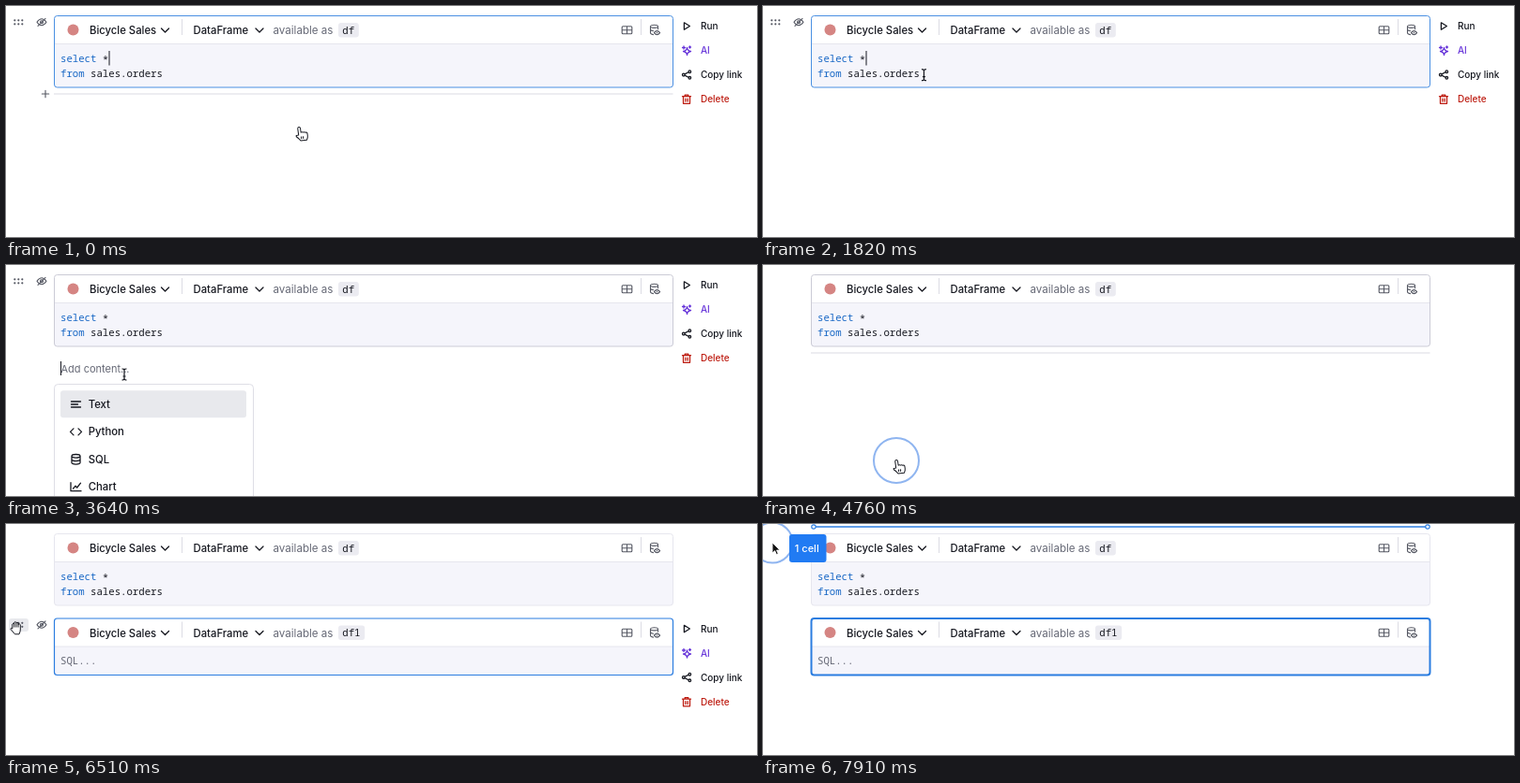
Animation of 800 by 247 pixels, one loop 8000 ms. Source, as an HTML page:

```html
<!DOCTYPE html>
<html lang="en">
<head>
<meta charset="utf-8">
<title>Adding a SQL cell</title>
<style>
  html, body { margin: 0; width: 100%; height: 100%; overflow: hidden; background: #fff; }
  svg { display: block; width: 800px; height: 247px; }
  text { font: 500 11.3px Inter, sans-serif; fill: #15171f; white-space: pre; }
  .muted { font-weight: 400; font-size: 11.6px; fill: #666976; }
  .code { font: 500 10.68px "Noto Sans Mono", monospace; }
  .key { fill: #1767c5; }
  .small { font-size: 10px; }
  .icon { fill: none; stroke: #15171f; stroke-width: 1.3; stroke-linecap: round; stroke-linejoin: round; }
  .gray { stroke: #555863; stroke-width: 1.1; }
  .pointer { fill: #fff; stroke: #15171f; stroke-width: 1; stroke-linejoin: round; }
</style>
</head>
<body>
<svg id="stage" viewBox="0 0 800 247"></svg>
<script>
const LOOP = 8000, STEP = 70;
const BLUE = '#2b7de0';

const text = (x, y, label, cls = '', extra = '') =>
  `<text x="${x}" y="${y}" class="${cls}" ${extra}>${label}</text>`;
const icon = (x, y, d, extra = '', cls = '') =>
  `<path class="icon ${cls}" transform="translate(${x} ${y})" d="${d}" ${extra}/>`;
const group = (id, body, y = 0) => `<g id="${id}" transform="translate(0 ${y})">${body}</g>`;
const vline = (x, y1, y2, color) => `<path d="M${x} ${y1}V${y2}" stroke="${color}"/>`;

const chevron = 'M-4-2L0 2L4-2';
const grid = 'M-4.3-4h8.6q1 0 1 1v6q0 1-1 1h-8.6q-1 0-1-1v-6q0-1 1-1zM-5.3 0H5.3M0-4V4';
const cylinder = 'M-4.5-3.5a4.5 1.8 0 0 1 9 0a4.5 1.8 0 0 1-9 0V3.5a4.5 1.8 0 0 0 9 0V-3.5M-4.5 0a4.5 1.8 0 0 0 9 0';
const dataView = 'M-4.5-4a4 1.6 0 0 1 8 0a4 1.6 0 0 1-8 0V3q0 1.4 3 1.8M3.5-4V-1M-4.5-.6q.5 1.2 3.2 1.5M-.6 2.8q3.1-4 6.2 0q-3.1 4-6.2 0M2.4 2.8h.2';

function cell(id, y, bodyHeight, variable, code) {
  const chip = 9 + variable.length * 6.4;
  return group(id, `
    <rect x="51.5" y="10.5" width="659" height="${30 + bodyHeight}" rx="3" fill="#fff"/>
    <path d="M51.5 40.5h659v${bodyHeight - 3}q0 3-3 3h-653q-3 0-3-3z" fill="#f5f5fb"/>
    <path d="M52 40.5H710" stroke="#e6e6ee"/>
    <rect id="${id}Border" x="51.5" y="10.5" width="659" height="${30 + bodyHeight}" rx="3" fill="none"/>
    <circle cx="71.5" cy="25.5" r="6" fill="#d58583"/>
    ${text(89, 30, 'Bicycle Sales')}${icon(169.5, 26, chevron, 'stroke-width="1.6"')}
    ${vline(187.5, 14, 31, '#dcdce4')}
    ${text(199.5, 30, 'DataFrame')}${icon(270, 26, chevron, 'stroke-width="1.6"')}
    ${text(284.5, 30, 'available as', 'muted')}
    <rect x="354" y="18" width="${chip}" height="15.5" rx="3" fill="#ebebf1"/>
    ${text(358.3, 29.6, variable, 'code')}
    ${icon(661.5, 25.8, grid, '', 'gray')}${vline(676.5, 14, 31, '#dcdce4')}
    ${icon(691, 25.8, dataView, '', 'gray')}${code}`, y);
}

function controls(id, y) {
  let dots = '';
  for (let i = 0; i < 6; i++)
    dots += `<circle cx="${9.3 + (i % 3) * 4}" cy="${15.3 + (i > 2) * 4}" r="1.1" fill="#555863"/>`;
  const purple = 'style="stroke:#6633d9"', red = 'style="stroke:#bd1b10"';
  return group(id, `${dots}
    ${icon(38, 17.3, 'M-5 0q5-7 10 0q-5 7-10 0M-1.5 0a1.5 1.5 0 0 0 3 0a1.5 1.5 0 0 0-3 0M-4 4L4-4', '', 'gray')}
    ${icon(725, 21.5, 'M-2.6-3.7L3.4 0L-2.6 3.7z')}${text(740, 25, 'Run', 'small')}
    ${icon(725, 47.5, 'M.5-3Q1 .5 4.5 1Q1 1.5.5 5Q0 1.5-3.5 1Q0 .5.5-3zM-3-4.5v3M-4.5-3h3M3.5-4.5v2M2.5-3.5h2', purple)}
    ${text(740, 51, 'AI', 'small', 'style="fill:#6633d9"')}
    ${icon(725, 73.5, 'M-2 -.6L2-2.8M-2 .6L2 2.8M-4.5 0a1.3 1.3 0 0 0 2.6 0a1.3 1.3 0 0 0-2.6 0M2-3.3a1.3 1.3 0 0 0 2.6 0a1.3 1.3 0 0 0-2.6 0M2 3.3a1.3 1.3 0 0 0 2.6 0a1.3 1.3 0 0 0-2.6 0')}
    ${text(740, 77, 'Copy link', 'small')}
    ${icon(725, 99.7, 'M-4.5-3h9M-1.8-3v-1.6h3.6V-3M-3.5-3V4.6h7V-3M-1.1-.5v2.8M1.1-.5v2.8', red)}
    ${text(740, 103.3, 'Delete', 'small', 'style="fill:#bd1b10"')}`, y);
}

const menuItems = [
  ['Text', 'M-5-3H5M-5 0H2M-5 3H5'],
  ['Python', 'M-2.5-3.5L-6 0L-2.5 3.5M2.5-3.5L6 0L2.5 3.5'],
  ['SQL', cylinder],
  ['Chart', 'M-5.5-4.5V4.5H5.5M-3 2L-.5-1L1.2.8L5-4'],
];
const ROW = 29.4;

const pointers = {
  hand: `<path transform="rotate(-8)" d="M-1.4 8V1a1.4 1.4 0 0 1 2.8 0V5.5q1.2-1 2.4.3q1.2-.7 2.3.4q1.9-.4 1.9 1.4V10q0 2-1.5 4.2H0Q-1.5 11.5-4 9.3q-.6-1.6 1.2-1.4z"/>
    <path d="M2.6 9.5v2.6M4.6 9.3v2.6"/>`,
  ibeam: '<path fill="none" d="M-2.5-6Q0-6 0-4.5V4.5Q0 6-2.5 6M2.5-6Q0-6 0-4.5M0 4.5Q0 6 2.5 6M-1.5 2h3" stroke-width="1.2"/>',
  grab: `<path d="M-4.2 1V-4q1-1.5 2 0V-5.6q1.1-1.6 2.1 0V-5.2q1.1-1.5 2.1 0V-3.6q1.2-1.3 2.3.2V2q0 2-1.3 4.8H-1.6L-6 1.4q0-1.9 1.8-.4z"/>
    <path d="M-2.2-4V-.5M-.1-5V-.5M2-4.5V-.5"/>`,
  arrow: '<path d="M0 0V11l2.6-2.4L4.4 12.6L6.2 11.8L4.5 8H8z" style="fill:#111;stroke:#fff;stroke-width:.8"/>',
};

const sql = `${text(58, 60, '<tspan class="key">select</tspan> <tspan dy="1.2">*</tspan>', 'code')}
  ${text(58, 76, '<tspan class="key">from</tspan> sales.orders', 'code')}`;

document.getElementById('stage').innerHTML = `
  ${cell('first', 0, 46.5, 'df', sql)}
  ${group('caret', vline(110, 48, 63.5, '#15171f'))}
  ${controls('firstControls', 0)}
  ${group('addLine', '<path d="M51 94H710.5" stroke="#dcdce4" stroke-width="1.2"/>')}
  ${group('plus', icon(42, 94, 'M-3.7 0H3.7M0-3.7V3.7', '', 'gray'))}
  ${group('menu', `
    ${text(58.5, 114.5, 'Add content...', 'muted', 'style="font-size:11px"')}
    ${vline(58.5, 103, 118, '#15171f')}
    <rect x="51.5" y="127.5" width="212" height="160" rx="4" fill="#fff" stroke="#dedee6"/>
    <rect id="rowMark" x="58" width="198" height="29" rx="3" fill="#e8e9ed"/>
    ${menuItems.map(([label, d], i) =>
      icon(74.5, 149 + i * ROW, d) + text(87.7, 153 + i * ROW, label)).join('')}`)}
  ${cell('second', 90.5, 30.5, 'df1', text(58, 59.7, 'SQL...', 'code', 'style="fill:#666976"'))}
  ${group('handleMark', '<rect x="3" y="101" width="21" height="14" rx="3" fill="#e8e9ed"/>')}
  ${controls('secondControls', 90.5)}
  ${group('dropLine', `<path d="M56 3H706" stroke="${BLUE}" stroke-width="1.6"/>
    <circle cx="54" cy="3" r="2.2" fill="#fff" stroke="${BLUE}" stroke-width="1.2"/>
    <circle cx="708" cy="3" r="2.2" fill="#fff" stroke="${BLUE}" stroke-width="1.2"/>`)}
  <g id="pointer">
    <circle id="ring" fill="#fff" fill-opacity=".5" stroke="#8fb5f0" stroke-width="2"/>
    <g id="badge"><rect x="18" y="-9" width="39.5" height="30" rx="3" fill="#217bf3"/>
      ${text(23.8, 10, '1 cell', '', 'style="fill:#fff;font-size:11px"')}</g>
    ${Object.entries(pointers).map(([id, body]) => `<g id="${id}" class="pointer">${body}</g>`).join('')}
  </g>`;

// Pointer hotspot: time, x, y
const path = [
  [0, 312, 130], [140, 312, 130], [910, 316, 55], [980, 316, 55], [1400, 200, 62],
  [1540, 200, 62], [2310, 105, 101], [3290, 105, 101], [3570, 126, 117], [3640, 126, 117],
  [4270, 142, 209], [4830, 142, 209], [5320, 110, 165], [5390, 110, 165], [6160, 14, 112],
  [6510, 11, 111], [7070, 11, 111], [7490, 11, 85], [7840, 10, 20], [LOOP, 10, 20],
];
// Press start, release, ring radius
const presses = [[3010, 3290, 24], [4620, 4900, 24], [6860, LOOP + 300, 21.5]];
const OPEN = 3150, PICK = 4690, INSERT = 4830, GRAB = 6160, DRAG = 7350, LIFT = 7560, DROP = 7700;

const el = id => document.getElementById(id);
const show = (id, on) => el(id).setAttribute('display', on ? 'inline' : 'none');
const set = (id, attrs) => Object.entries(attrs).forEach(([k, v]) => el(id).setAttribute(k, v));
const clamp = v => Math.max(0, Math.min(1, v));

function position(t) {
  const i = path.findIndex(p => p[0] > t);
  const [t0, x0, y0] = path[i - 1], [t1, x1, y1] = path[i];
  const u = (t - t0) / (t1 - t0), e = u * u * (3 - 2 * u);
  return [x0 + (x1 - x0) * e, y0 + (y1 - y0) * e];
}

function pointerKind(t, x, y) {
  if (t >= DRAG) return 'arrow';
  if (t >= GRAB - 140) return 'grab';
  if (t < OPEN) return y > 88 ? 'hand' : 'ibeam';
  if (t < PICK) return y < 127 ? 'ibeam' : 'hand';
  if (t < 4900) return 'hand';
  return x > 51 && y > 131 && y < 161 ? 'ibeam' : 'arrow';
}

function render(t) {
  const [x, y] = position(t);
  const menuOpen = t >= OPEN && t < PICK;

  set('firstBorder', { stroke: t < OPEN ? '#4a90e2' : t < INSERT ? '#cbcbd6' : '#e6e6ee' });
  set('secondBorder', { stroke: BLUE, 'stroke-width': t >= LIFT ? 2 : 1.2 });
  show('caret', t < OPEN);
  show('firstControls', t < PICK);
  show('plus', t < OPEN && y > 88);
  show('addLine', t < OPEN ? y > 88 : t >= PICK && t < INSERT);
  show('menu', menuOpen);
  set('rowMark', { y: 134.3 + ROW * Math.max(0, Math.floor((y - 134) / ROW)) });
  show('second', t >= INSERT);
  show('secondControls', t >= INSERT && t < DRAG);
  show('handleMark', t >= GRAB && t < DRAG);
  show('dropLine', t >= DROP);
  show('badge', t >= DRAG);

  const kind = pointerKind(t, x, y);
  Object.keys(pointers).forEach(id => show(id, id === kind));
  set('pointer', { transform: `translate(${x.toFixed(2)} ${y.toFixed(2)})` });

  const press = presses.find(([from, to]) => t >= from && t < to);
  show('ring', press);
  if (press) {
    const [from, to, radius] = press, grow = clamp((t - from + STEP) / 140);
    set('ring', { r: radius * (.7 + .3 * grow), opacity: Math.min(grow, clamp((to - t) / 140)) });
  }
}

const start = performance.now();
function tick() {
  const t = (performance.now() - start) % LOOP;
  render(Math.min(Math.floor(t / STEP) * STEP, 7910));
  requestAnimationFrame(tick);
}
tick();
</script>
</body>
</html>
```
